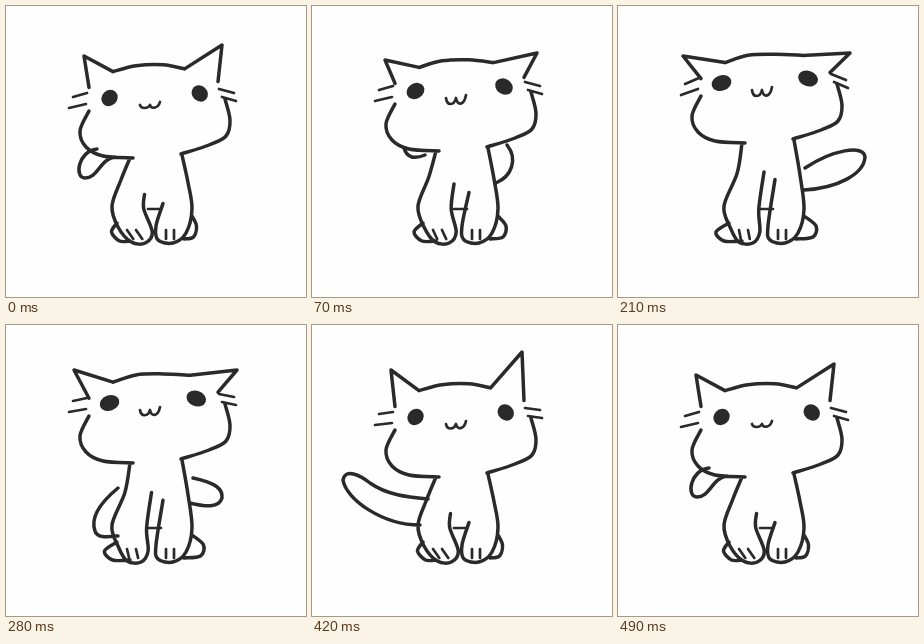
These frames come from a looping animation (300 by 291 pixels, 0.56 s). An HTML page:

```html
<!DOCTYPE html>
<html lang="en">
<head>
<meta charset="utf-8">
<title>Bouncing cat</title>
<style>
  html, body { margin: 0; width: 100%; height: 100%; overflow: hidden; background: #fefefe; }
  svg { display: block; width: 100%; height: 100%; }
  path { fill: none; stroke: #2a2a2a; stroke-linecap: round; stroke-linejoin: round; }
  ellipse { fill: #2a2a2a; }
</style>
</head>
<body>
<svg viewBox="0 0 300 291">
  <path id="bold" stroke-width="3.5"/>
  <path id="fine" stroke-width="2.7"/>
  <ellipse/>
  <ellipse/>
</svg>
<script>
const STEP = 70;

// lift raises the head and stretches the body; droop lowers the whisker ends.
const sitting = { lift: -1, droop: 4, smile: 4, ears: [[78, 50], [216, 39]],
  tail: 'M91,143C72,145 68,172 79,172 92,172 94,153 109,151' };
const dipping = { lift: 6, droop: 4, smile: 8, ears: [[73, 54], [225, 47]],
  tail: 'M92,142Q96,156 113,149M195,139C206,153 200,170 184,177' };
const low = { lift: 14, droop: 8, smile: 10, ears: [[62, 55], [234, 50]],
  tail: 'M223,108C233,102 241,120 240,138 236,165 222,181 186,188M209,129C224,133 223,145 218,155 212,163 200,164 186,167' };
const lifting = { lift: 14, droop: 6, smile: 8, ears: [[65, 50], [232, 47]],
  tail: 'M187,162C214,144 246,138 247,151 246,168 220,182 186,184' };
const rising = { lift: 13, droop: 3, smile: 7, ears: [[68, 45], [231, 45]],
  tail: 'M187,153C210,158 217,164 216,173 213,183 200,182 184,178M112,163C95,177 84,192 89,206 91,213 100,212 112,211' };
const tall = { lift: 0, droop: 0, smile: 8, ears: [[80, 41], [206, 30]],
  tail: 'M120,178C94,160 52,172 44,195 40,212 66,214 104,206M69,198C76,186 92,185 105,194' };
const settling = { lift: -1, droop: 2, smile: 6, ears: [[79, 45], [210, 27]],
  tail: 'M108,200C70,200 34,174 31,155 33,143 48,150 58,158 75,170 95,172 116,174' };

const poses = [sitting, dipping, low, lifting, rising, tall, settling, sitting];

const line = (...points) => 'M' + points.join('L');

// Smooth curve through all points (Catmull-Rom as cubic Béziers).
function curve(...p) {
  let d = 'M' + p[0];
  for (let i = 0; i < p.length - 1; i++) {
    const before = p[i - 1] || p[i], from = p[i], to = p[i + 1], after = p[i + 2] || to;
    const c1 = from.map((v, k) => v + (to[k] - before[k]) / 6);
    const c2 = to.map((v, k) => v - (after[k] - from[k]) / 6);
    d += `C${c1} ${c2} ${to}`;
  }
  return d;
}

function headOutline({ lift, ears: [left, right] }) {
  const earL = [107, 65 - 0.6 * lift], earR = [179 + 0.4 * lift, 62 - 0.9 * lift];
  const top = 58 - 0.7 * lift;
  const raised = (x, y) => [x, y - lift];
  return line([83, 81 - 0.6 * lift], left, earL) +
    line(earR, right, [212, 75 - 0.6 * lift]) +
    curve(earL, [130, top + 1], [157, top], earR) +
    curve(raised(219, 92), raised(224, 113), raised(220, 129), raised(203, 138), raised(175, 147)) +
    curve(raised(83, 104), raised(74, 124), raised(80, 140), raised(97, 149), raised(127, 151));
}

function bodyOutline({ lift }) {
  const paw = -0.3 * lift, spread = 0.5 * lift;
  return curve([124, 151 - lift], [115 + 0.3 * lift, 174 - 0.5 * lift], [106, 200], [112, 221],
      [125 + paw, 236], [139 + paw, 237], [146 + paw, 226], [138 + 0.2 * lift, 203],
      [139 + 0.5 * lift, 187 - 1.5 * lift]) +
    curve([176, 148 - lift], [182, 176 - 0.5 * lift], [186, 203], [180, 227], [167, 237],
      [152, 234], [150, 220], [157, 196 - 1.6 * lift]) +
    curve([111, 217], [105 - spread, 226], [113 - spread, 235], [124, 235]) +
    curve([186, 210], [191 + spread, 220], [188 + spread, 231], [178, 233]);
}

function details({ lift, droop, smile }) {
  const whisker = (x, y, dx) => line([x, y - lift], [x + dx, y - lift + droop]);
  const toes = [121, 130, 160, 168].map(x =>
    line([x, 224], [x + (x < 150 ? 6 - 0.3 * lift : 0), 233]));
  return whisker(81, 86, -14) + whisker(80, 97, -17) +
    whisker(213, 82, 15) + whisker(216, 90, 14) +
    `M134,${98 - lift}c1,${smile} 8,${smile} 10,0c1,${smile} 8,${smile} 10,-3` +
    toes.join('') + line([142, 203], [155, 203]);
}

const bold = document.getElementById('bold');
const fine = document.getElementById('fine');
const [leftEye, rightEye] = document.querySelectorAll('ellipse');

function placeEye(eye, x, y, tilt, lift) {
  eye.setAttribute('rx', 8.7 + 0.1 * lift);
  eye.setAttribute('ry', 7.7);
  eye.setAttribute('transform', `translate(${x} ${y - lift}) rotate(${tilt})`);
}

function draw(pose) {
  const { lift, tail } = pose, tilt = 42 - 1.7 * lift;
  bold.setAttribute('d', headOutline(pose) + bodyOutline(pose) + tail);
  fine.setAttribute('d', details(pose));
  placeEye(leftEye, 103.5, 91, -tilt, lift);
  placeEye(rightEye, 193.5 - 0.25 * lift, 86.5, tilt, lift);
}

const start = performance.now();
function tick() {
  const elapsed = performance.now() - start;
  draw(poses[Math.floor(elapsed / STEP) % poses.length]);
  requestAnimationFrame(tick);
}
tick();
</script>
</body>
</html>
```
